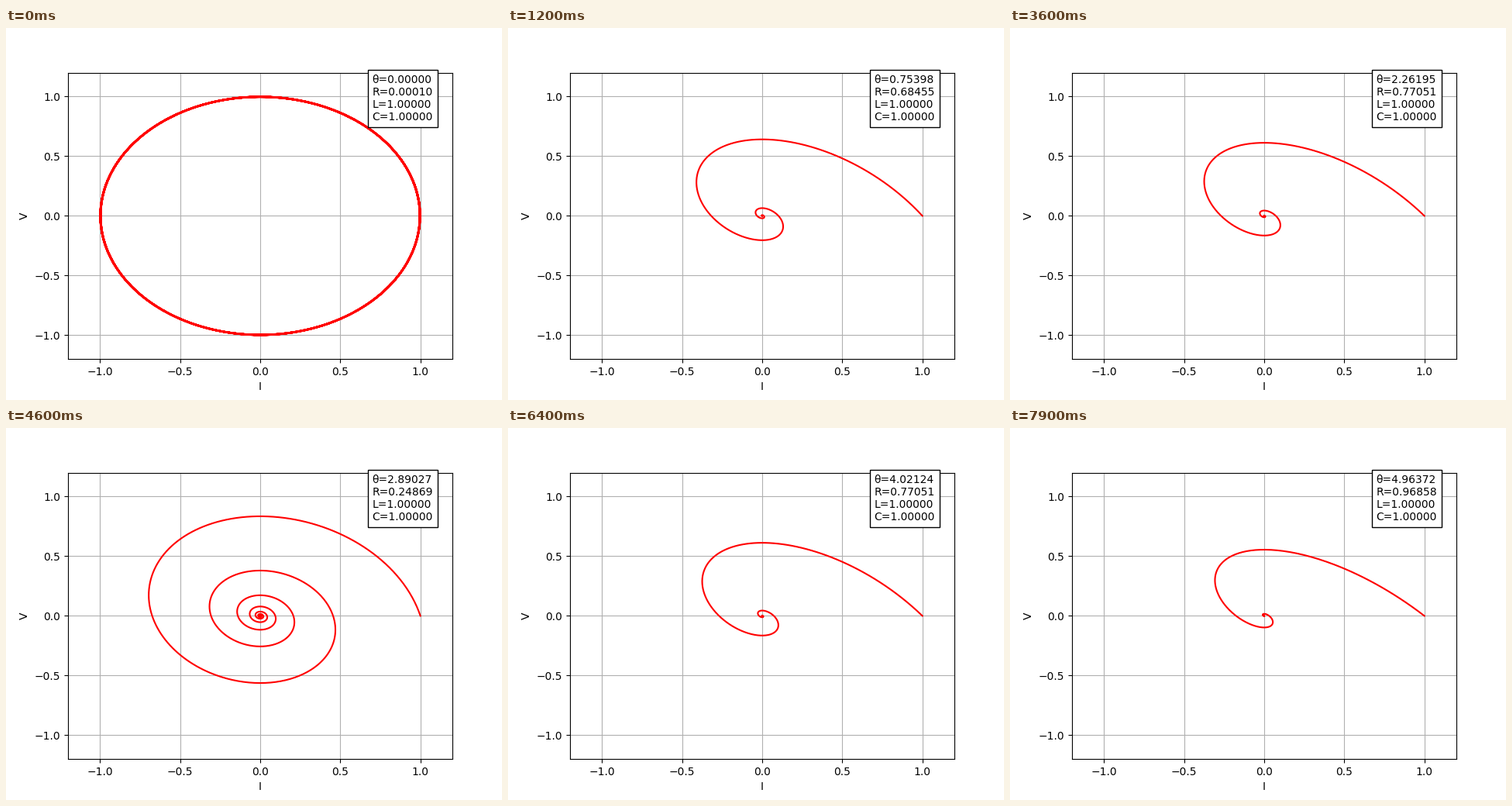
Animation of 640x480 px, one loop 8000 ms. Source, as a matplotlib script:

```python
import numpy as np
import matplotlib.pyplot as plt
from matplotlib.animation import FuncAnimation

FRAMES = 80
STEP = 2 * np.pi / 100
L = C = 1.0
t = np.linspace(0, 100, 5000)


def discharge(R):
    """Current and voltage of an underdamped series RLC circuit, I(0)=1, V(0)=0."""
    a = R / (2 * L)
    w = np.sqrt(1 / (L * C) - a * a)
    decay = np.exp(-a * t)
    current = decay * (np.cos(w * t) - a / w * np.sin(w * t))
    voltage = decay * np.sin(w * t) / (w * C)
    return current, voltage


fig, ax = plt.subplots(figsize=(6.4, 4.8), dpi=100)
ax.set(xlim=(-1.2, 1.2), ylim=(-1.2, 1.2), xlabel="I", ylabel="V")
ax.set_xticks(np.arange(-1, 1.1, 0.5))
ax.set_yticks(np.arange(-1, 1.1, 0.5))
ax.grid(True)
curve, = ax.plot([], [], color="red", lw=1.5)
info = ax.text(0.7, 0.8, "", bbox=dict(facecolor="white", edgecolor="black"))


def update(i):
    theta = i * STEP
    R = max(abs(np.sin(theta)), 1e-4)
    curve.set_data(*discharge(R))
    info.set_text(f"θ={theta:.5f}\nR={R:.5f}\nL={L:.5f}\nC={C:.5f}")
    return curve, info


anim = FuncAnimation(fig, update, frames=FRAMES, interval=100,
                     repeat=True, repeat_delay=0)
plt.show()
```
